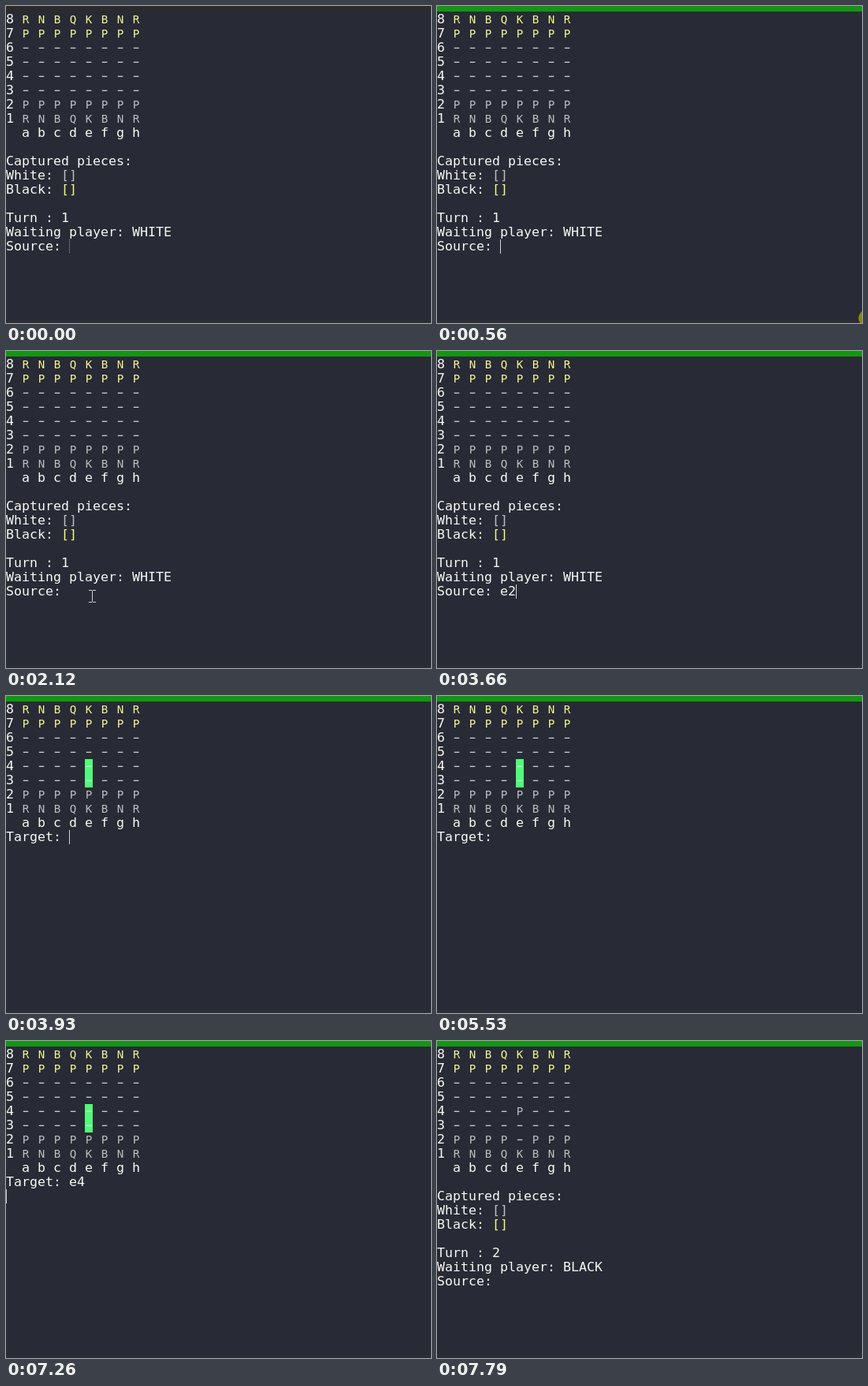
An HTML page that plays this animation: 539 by 402 pixels, repeating every 8 s.

```html
<!DOCTYPE html>
<html lang="en">
<head>
<meta charset="utf-8">
<title>Console chess</title>
<style>
  html, body { margin: 0; width: 100%; height: 100%; overflow: hidden; background: #282a36; }
  svg { display: block; width: 539px; height: 402px; }
  text { font: 16.61px "DejaVu Sans Mono", monospace; white-space: pre; }
  .piece { font-size: 14.2px; text-anchor: middle; }
  .empty { font-size: 12.6px; text-anchor: middle; }
</style>
</head>
<body>
<svg viewBox="0 0 539 402">
  <rect width="539" height="402" fill="#282a36"/>
  <rect y="398" width="539" height="4" fill="#2b2c34"/>
  <rect id="bar" width="539" height="7"/>
  <g id="screen"></g>
  <rect id="caret" width="1" height="18" fill="#d4d4d0"/>
  <path id="dottedCaret" d="M80.5 296V314" stroke="#a0a0a0" stroke-dasharray="1 1"/>
  <circle id="press" cx="545" cy="396" r="10.5" fill="#8c8813"/>
  <path id="pointer" d="M-4 -7.5H0M1 -7.5H5M-4 7.5H0M1 7.5H5M.5 -7V7" fill="none" stroke="#d0d0d2"/>
</svg>
<script>
const LOOP = 8000, FRAME = 66, BLINK = 530;
const CELL = 10, LINE = 18, TOP = 8;
const FOCUS = 500, RELEASE = 700, REPLY_DELAY = 70;
const WHITE = "#f8f8f2", YELLOW = "#f1fa8c", GREY = "#bfbfbf", GREEN = "#50fa7b";

const el = id => document.getElementById(id);
const screen = el("screen");
const show = (node, visible) => node.setAttribute("visibility", visible ? "visible" : "hidden");

// Two moves are typed, each one ended by Enter.
const keys = [
  { at: 3330, key: "e" }, { at: 3660, key: "2" }, { at: 3930, key: "\n" },
  { at: 6790, key: "e" }, { at: 7060, key: "4" }, { at: 7260, key: "\n" }
];

const glides = [
  { at: RELEASE, frames: 3, x: 48, y: 340 },
  { at: 1174, frames: 3, x: 95, y: 311 },
  { at: 1580, frames: 2, x: 100, y: 311 },
  { at: 1914, frames: 2, x: 109, y: 311 }
];

function add(tag, attrs, content = "") {
  const node = document.createElementNS("http://www.w3.org/2000/svg", tag);
  for (const name in attrs) node.setAttribute(name, attrs[name]);
  node.textContent = content;
  screen.append(node);
}

const baseline = row => TOP + row * LINE + 14;

function write(col, row, content, fill = WHITE) {
  add("text", { x: col * CELL, y: baseline(row), fill }, content);
}

function drawSquare(col, row, piece, fill) {
  const x = (col + 0.5) * CELL;
  if (piece === "-") add("text", { class: "empty", x, y: baseline(row) - 1.4, fill: WHITE }, "\u2212");
  else add("text", { class: "piece", x, y: baseline(row), fill }, piece);
}

function drawBoard(moved, marked) {
  const back = "RNBQKBNR", pawns = "P".repeat(8), empty = "-".repeat(8);
  const ranks = [back, pawns, empty, empty, empty, empty, pawns, back];
  if (moved) {
    ranks[4] = "----P---";
    ranks[6] = "PPPP-PPP";
  }
  if (marked) add("rect", { x: 100, y: 80, width: CELL, height: 2 * LINE, fill: GREEN });
  ranks.forEach((rank, row) => {
    write(0, row, String(8 - row));
    [...rank].forEach((piece, file) =>
      drawSquare(2 + file * 2, row, piece, row < 2 ? YELLOW : GREY));
  });
  write(2, 8, "a b c d e f g h");
}

function drawStatus(turn, player) {
  write(0, 10, "Captured pieces:");
  write(0, 11, "White:");
  write(7, 11, "[]", GREY);
  write(0, 12, "Black:");
  write(7, 12, "[]", YELLOW);
  write(0, 14, "Turn : " + turn);
  write(0, 15, "Waiting player: " + player);
}

function drawConsole(stage, typed) {
  screen.replaceChildren();
  drawBoard(stage === 2, stage === 1);
  if (stage === 0) drawStatus(1, "WHITE");
  if (stage === 2) drawStatus(2, "BLACK");
  if (stage === 1) write(0, 9, "Target: " + typed);
  else write(0, 16, "Source: " + typed);
}

function drawCaret(t, col, row) {
  const lastKey = keys.findLast(k => k.at <= t);
  const idle = t - (lastKey ? lastKey.at : FOCUS);
  const caret = el("caret");
  show(caret, idle >= 0 && Math.floor(idle / BLINK) % 2 === 0);
  caret.setAttribute("x", col * CELL);
  caret.setAttribute("y", TOP + row * LINE);
}

function drawPointer(t) {
  let x = 529, y = 392;
  for (const glide of glides) {
    const frame = Math.floor((t - glide.at) / FRAME);
    const u = Math.min(1, Math.max(0, frame / glide.frames));
    const eased = u * u * (3 - 2 * u);
    x += (glide.x - x) * eased;
    y += (glide.y - y) * eased;
  }
  el("pointer").setAttribute("transform", `translate(${Math.round(x)} ${Math.round(y)})`);
  show(el("pointer"), t >= RELEASE && t < keys[0].at);
}

let drawn;
function render(t) {
  const lines = keys.filter(k => k.at <= t).map(k => k.key).join("").split("\n");
  const waiting = lines.length === 3 && t < keys[5].at + REPLY_DELAY;
  const stage = waiting ? 1 : lines.length - 1;
  const typed = lines[stage];

  if (drawn !== stage + typed) {
    drawn = stage + typed;
    drawConsole(stage, typed);
  }
  if (waiting) drawCaret(t, 0, 10);
  else drawCaret(t, 8 + typed.length, stage === 1 ? 9 : 16);
  drawPointer(t);

  el("bar").setAttribute("fill", t < FOCUS ? "#2b2b2b" : "#149614");
  show(el("dottedCaret"), t < FOCUS);
  show(el("press"), t >= FOCUS && t < RELEASE);
}

const start = performance.now();
function tick() {
  render((performance.now() - start) % LOOP);
  requestAnimationFrame(tick);
}
tick();
</script>
</body>
</html>
```
